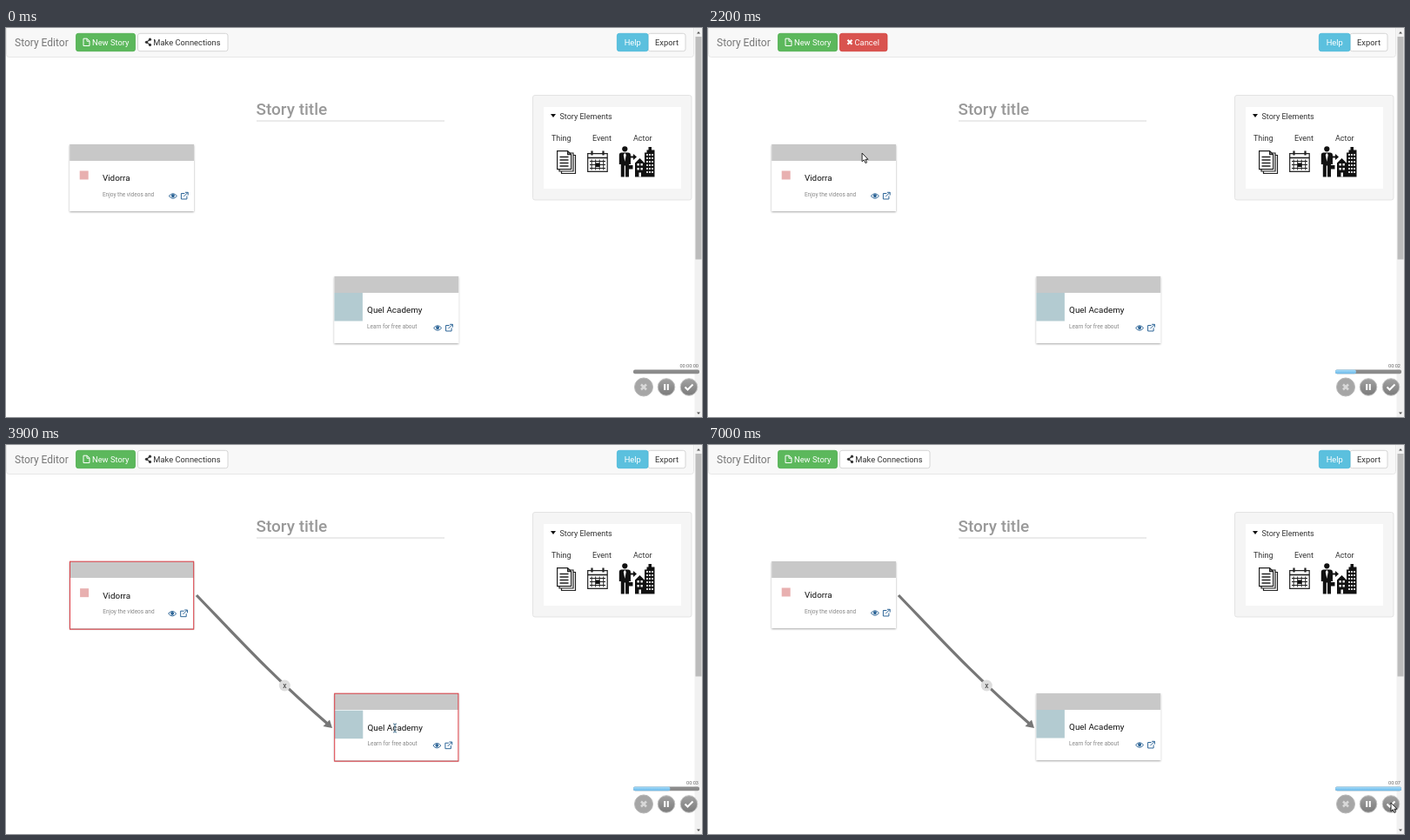
These frames come from a looping animation (800 px wide and 448 px high, 7.1 s). An HTML page:

```html
<!DOCTYPE html>
<html lang="en">
<head>
<meta charset="utf-8">
<title>Story Editor</title>
<style>
html, body { margin: 0; width: 100%; height: 100%; overflow: hidden; background: #fff; }
svg { display: block; width: 800px; height: 448px; font: 9.33px Roboto, sans-serif; fill: #333; }
.line { fill: none; stroke: #333; }
.white { fill: #fff; }
.white .line { stroke: #fff; }
.card .frame { fill: none; stroke: none; }
.card .links { fill: none; stroke: #2d6597; }
.card.selected .frame { stroke: #dc3c44; }
.card.selected .body { transform: translate(.4px, .7px); }
.card.selected .links { transform: translate(-.7px, .7px); }
</style>
</head>
<body>
<svg viewBox="0 0 800 448">
  <defs>
    <filter id="shadow" x="-10%" y="-10%" width="120%" height="125%">
      <feDropShadow dx="0" dy="1" stdDeviation="1" flood-opacity=".35"/>
    </filter>
    <linearGradient id="fill" x2="0" y2="1">
      <stop stop-color="#a5dcfa"/><stop offset="1" stop-color="#6cb9e8"/>
    </linearGradient>
    <linearGradient id="knob" x2="0" y2="1">
      <stop stop-color="#a2a2a2"/><stop offset="1" stop-color="#7b7b7b"/>
    </linearGradient>
  </defs>

  <!-- toolbar -->
  <rect x=".5" y="-3" width="790" height="36.5" rx="3" fill="#f8f8f8" stroke="#e7e7e7"/>
  <text x="10" y="21" font-size="12" fill="#777">Story Editor</text>
  <g class="white">
    <rect x="80.5" y="6.3" width="68" height="20.4" rx="2.5" fill="#5cb85c" stroke="#4cae4c" stroke-width=".8"/>
    <path class="line" d="M89 12.2h4.3l2.7 2.7v5.6h-7zM93 12.2v3h3"/>
    <text x="99" y="19.6">New Story</text>
  </g>
  <g id="connect">
    <rect id="connectBox" x="151.5" y="6.3" width="103.5" height="20.4" rx="2.5" stroke-width=".8"/>
    <path class="line" d="M165.5 13.2l-4 3.1 4 3.1" stroke-width="1.1"/>
    <circle cx="165.5" cy="13.2" r="1.6"/><circle cx="161.5" cy="16.3" r="1.6"/><circle cx="165.5" cy="19.4" r="1.6"/>
    <text x="169.3" y="19.6">Make Connections</text>
  </g>
  <g id="cancel" class="white">
    <rect x="151.5" y="6.3" width="54.5" height="20.4" rx="2.5" fill="#d9534f" stroke="#d43f3a" stroke-width=".8"/>
    <path class="line" d="M160.5 13.7l5 5m0-5l-5 5" stroke-width="2.2"/>
    <text x="168.5" y="19.6">Cancel</text>
  </g>
  <rect x="738" y="6.3" width="43" height="20.4" rx="2.5" fill="#fff" stroke="#ccc" stroke-width=".8"/>
  <rect x="702.4" y="6.3" width="35.6" height="20.4" rx="2.5" fill="#5bc0de" stroke="#46b8da" stroke-width=".8"/>
  <text class="white" x="710.7" y="19.6">Help</text>
  <text x="746" y="19.6">Export</text>

  <text x="287.5" y="99.5" font-size="19" font-weight="500" fill="#999">Story title</text>
  <path d="M288 107h216" stroke="#ccc" stroke-width=".8"/>

  <!-- element palette -->
  <rect x="605.5" y="77.5" width="182.5" height="120.5" rx="2.5" fill="#f5f5f5" stroke="#e3e3e3"/>
  <rect class="white" x="618" y="91" width="158" height="94"/>
  <path d="M626 99h6l-3 4z" fill="#111"/>
  <g font-size="9">
    <text x="636.5" y="104.5">Story Elements</text>
    <text x="627" y="130">Thing</text><text x="674" y="130">Event</text><text x="721" y="130">Actor</text>
  </g>
  <g fill="#fff" stroke="#222" stroke-width="1.2">
    <path d="M638.5 146.5h16v21h-16z"/>
    <path d="M636 144h16v21h-16z"/>
    <path d="M633.6 141.6h12l4 4v17h-16zM645.6 141.6v4h4"/>
    <path d="M636.5 148.5h10m-10 3.5h10m-10 3.5h10m-10 3.5h10" stroke-width="1.3"/>
    <path d="M668.7 144.7h22.5v20.6h-22.5z"/>
    <path d="M668.7 149.5h22.5" stroke-width="1.6"/>
    <path d="M673.5 141.5v5m13-5v5" stroke-width="2.2"/>
    <path d="M671 153.5h18m-18 4h18m-18 4h18M673.2 151.500v12m4.500-12v12m4.500-12v12m4.500-12v12" stroke-width="1"/>
    <path d="M677.7 155.5h4.800v4.500h-4.800z" fill="#111" stroke="none"/>
  </g>
  <g fill="#111">
    <circle cx="711.3" cy="139.3" r="3.1"/>
    <path d="M707.5 143.500h7.500q3 0 3 3v10.500h-2v14.500h-4v-13h-1.200v13h-4v-14.500h-2v-10.500q0-3 2.700-3zM716 158h4.500v4.500h-4.500z"/>
    <path d="M718 147.500h3v-2.500l4 3.500-4 3.500v-2.500h-3zM723 155.500l5.500-5.500 5.500 5.500v16h-11zM734 143.500h2.500v-3h2v-3.500h3.500v3.500h3.500v31h-11.500z"/>
    <path class="white" d="M711.300 144l1.500 2-1.500 8-1.500-8zM725.500 156h2.300v2.500h-2.300zm4 0h2.300v2.500h-2.300zm-4 5h2.300v2.500h-2.300zm4 0h2.300v2.500h-2.300zm-2 5.500h2.500v5h-2.500z"/>
    <path d="M737 145v24m3-24v24m3-24v24" stroke="#fff" stroke-width="1.600" stroke-dasharray="2 2"/>
  </g>

  <g id="cards"></g>

  <g id="link">
    <path d="M219 173C268 224 308 268 369 320.5" fill="none" stroke="#777" stroke-width="3.2"/>
    <path d="M375 326l-10.500-2 7.500-7.500z" fill="#777"/>
    <circle cx="320.3" cy="277" r="6.500" fill="#ddd"/>
    <text x="320.3" y="279.7" font-size="8.5" text-anchor="middle">x</text>
  </g>

  <!-- scrollbar -->
  <path d="M791.5 0h8.5v448h-8.500z" fill="#f1f1f1"/>
  <path d="M792.5 10h7v256.500h-7z" fill="#bcbcbc"/>
  <path d="M794 6.500h4l-2-2.500zM794 442.500h4l-2 2.500z" fill="#555"/>

  <!-- recorder -->
  <text id="clock" x="796" y="391" font-size="5.6" text-anchor="end" fill="#666"></text>
  <rect x="721" y="393.5" width="76" height="4.7" rx="2" fill="#8b8b8b"/>
  <rect id="bar" x="721" y="393.5" height="4.700" rx="2" fill="url(#fill)"/>
  <g stroke="#c4c4c4" fill="url(#knob)">
    <circle cx="733" cy="413.5" r="10.5" fill="#a6a6a6" stroke="#b8b8b8"/>
    <circle cx="759" cy="413.5" r="9.8"/>
    <circle cx="785" cy="413.5" r="9.8"/>
  </g>
  <path class="line" d="M730 410.500l6 6m0-6l-6 6" style="stroke:#d8d8d8" stroke-width="2.500"/>
  <path class="line" d="M757.200 410v7m3.600-7v7M780.500 413.500l3 3 6-6" style="stroke:#fff" stroke-width="2"/>

  <g id="tip">
    <rect x="152.5" y="36" width="101" height="16" rx="1.3" fill="#5c5c5c"/>
    <text class="white" x="203" y="46.2" font-size="6.1" font-weight="500" text-anchor="middle">select element to relate on canvas</text>
  </g>

  <g id="cursor" fill="#fff" stroke="#111" stroke-width=".9" stroke-linejoin="round">
    <path id="arrow" d="M0 0v9.800l2.200-2 1.700 3.700 1.600-.7-1.600-3.600h3z"/>
    <path id="hand" d="M-.9 7V.7q.9-1.300 1.800 0v4l4.600 1.100q1 .4 1 1.500l-.8 5.700h-5.400l-3.500-4.800q.3-1.700 2.300.3z"/>
    <path id="beam" d="M-2-5q2 0 2 1.200 0-1.200 2-1.200M0-4V4M-2 5q2 0 2-1.200 0 1.200 2 1.200" fill="none" stroke="#2e5f80"/>
  </g>
</svg>
<script>
const LOOP = 7100, STEP = 100;
const $ = id => document.getElementById(id);
const show = (id, on) => $(id).style.display = on ? '' : 'none';

const card = (id, x, y, name, note, logo) => `
  <g id="${id}" class="card" transform="translate(${x} ${y})">
    <rect width="142.8" height="77" fill="#fff" filter="url(#shadow)"/>
    <rect width="142.8" height="19" fill="#c8c8c8"/>
    <g class="body">${logo}
      <text x="37.7" y="42" font-size="9.9" fill="#111">${name}</text>
      <text x="37.7" y="59.5" font-size="6.5" fill="#888">${note}</text>
    </g>
    <g class="links">
      <path d="M114.200 59.500q4.500-5.500 9 0-4.500 5.500-9 0z"/>
      <circle cx="118.7" cy="59.2" r="1.5" fill="#2d6597"/>
      <path d="M132.200 56.500h-4v6.500h6.500v-3.500M130.900 60.300l5-5M132.700 55.300h3.300v3.300"/>
    </g>
    <rect class="frame" x=".3" y=".2" width="142.2" height="78"/>
  </g>`;

$('cards').innerHTML =
  card('videos', 73.2, 134, 'Vidorra', 'Enjoy the videos and',
    '<rect x="11.5" y="30.5" width="10" height="10" fill="#e8b0b0"/>') +
  card('school', 377.4, 286, 'Quel Academy', 'Learn for free about',
    '<rect y="19" width="32.5" height="32.5" fill="#b3cbd1"/>');

// pointer stops: time, x, y
const stops = [
  [100, 785, 413], [700, 226, 20], [1400, 226, 20], [1500, 222, 19], [1700, 222, 19],
  [2400, 166, 175], [2900, 166, 175], [3500, 447, 326], [4500, 447, 326], [5300, 785, 412]
];

function pointerAt(t) {
  const next = stops.findIndex(s => s[0] > t);
  if (next < 0) return stops.at(-1).slice(1);
  if (next === 0) return stops[0].slice(1);
  const [t0, x0, y0] = stops[next - 1], [t1, x1, y1] = stops[next];
  const u = (t - t0) / (t1 - t0), k = u * u * (3 - 2 * u);
  return [x0 + (x1 - x0) * k, y0 + (y1 - y0) * k];
}

function draw(t) {
  const hover = t >= 700 && t < 1400;
  const picking = t >= 1400 && t < 3700;
  const typing = t >= 3500 && t <= 4500;

  show('connect', !picking);
  show('cancel', picking);
  show('tip', hover);
  $('connectBox').setAttribute('fill', hover ? '#e6e6e6' : '#fff');
  $('connectBox').setAttribute('stroke', hover ? '#adadad' : '#ccc');

  $('videos').classList.toggle('selected', t >= 2600 && t < 4500);
  $('school').classList.toggle('selected', t >= 3700 && t < 4500);
  show('link', t >= 3700);

  $('clock').textContent = t < STEP ? '00:00:00' : '00:0' + Math.floor(t / 1000);
  $('bar').setAttribute('width', 76 * Math.min(1, t / 7000));

  show('cursor', t >= STEP);
  $('cursor').setAttribute('transform', `translate(${pointerAt(t)})`);
  show('hand', hover);
  show('beam', typing);
  show('arrow', !hover && !typing);
}

function tick() {
  draw(Math.floor(performance.now() % LOOP / STEP) * STEP);
  requestAnimationFrame(tick);
}
tick();
</script>
</body>
</html>
```
